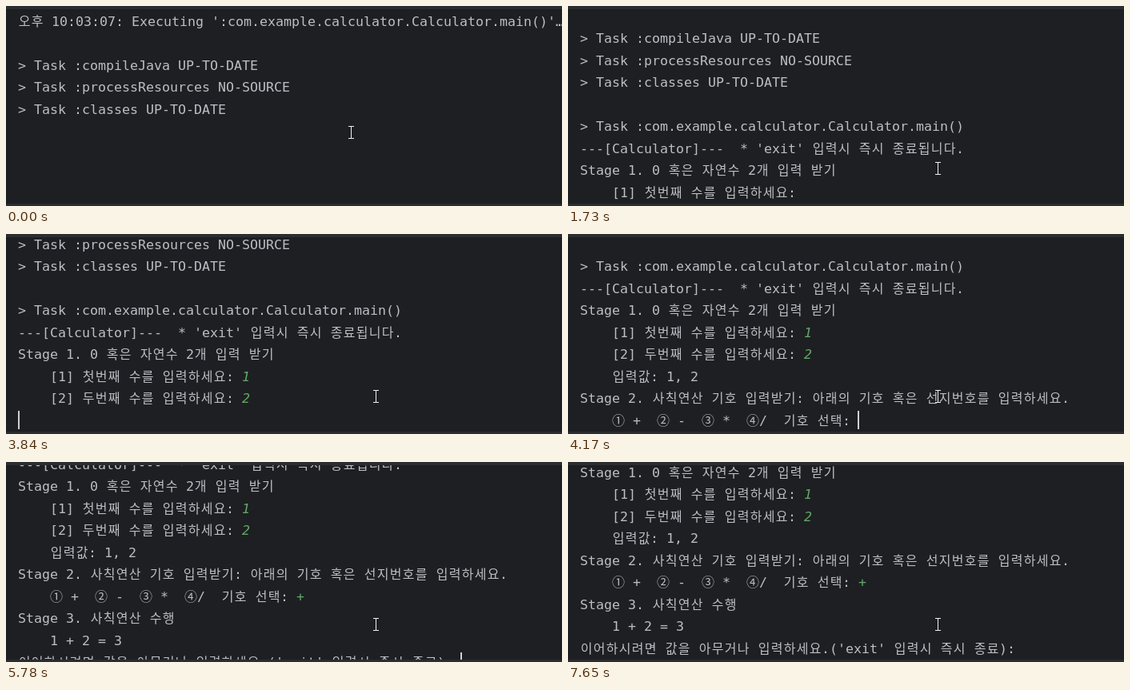
Write an HTML page that moves like this. It is 695 px wide and 250 px high and loops after 8 s.

```html
<!DOCTYPE html>
<html lang="ko">
<head>
<meta charset="utf-8">
<title>Calculator console</title>
<style>
  html, body { margin: 0; width: 100%; height: 100%; overflow: hidden; background: #1e1f22; }
  svg { display: block; width: 695px; height: 250px; }
  text {
    font: 16.6px "DejaVu Sans Mono", "Noto Sans Mono", monospace;
    fill: #bcbec4;
    text-anchor: middle;
    white-space: pre;
  }
  .wide { font: 300 16px "Noto Sans CJK KR", "Noto Sans CJK JP", sans-serif; }
  .input { fill: #62a968; font-style: italic; }
  .edge { fill: #2b2d30; }
  #caret { fill: #ced0d6; }
  #mouse { fill: none; stroke: #f0f0f2; }
</style>
</head>
<body>
<svg viewBox="0 0 695 250">
  <rect width="695" height="250" fill="#1e1f22"/>
  <g id="log"></g>
  <rect id="caret" width="2" height="23"/>
  <rect class="edge" width="695" height="4"/>
  <rect class="edge" y="247" width="695" height="3"/>
  <path id="mouse" d="M-3.5 -7.5H3.5M0 -7.5V7.5M-3.5 7.5H3.5"/>
</svg>
<script>
const LOOP = 8000, LEFT = 15, CELL = 10, WIDE = 16;
const PITCH = 27.5, TOP = 25, BOTTOM = 239;
const BLINK = 500, CLICK = 1230, FOCUS = 2230;
const GLIDE = 70, GLIDE_LAG = 17.5;
const NS = "http://www.w3.org/2000/svg";

// Each block is printed at once; its last line may wait for an answer.
const BLOCKS = [
  { at: 0, text: `오후 10:03:07: Executing ':com.example.calculator.Calculator.main()'…

> Task :compileJava UP-TO-DATE
> Task :processResources NO-SOURCE
> Task :classes UP-TO-DATE` },
  { at: 130, answer: "1", typed: 2430, sent: 2820, text: `
> Task :com.example.calculator.Calculator.main()
---[Calculator]---  * 'exit' 입력시 즉시 종료됩니다.
Stage 1. 0 혹은 자연수 2개 입력 받기
    [1] 첫번째 수를 입력하세요: ` },
  { at: 3090, answer: "2", typed: 3490, sent: 3840, text: "    [2] 두번째 수를 입력하세요: " },
  { at: 4170, answer: "+", typed: 5240, sent: 5510, text: `    입력값: 1, 2
Stage 2. 사칙연산 기호 입력받기: 아래의 기호 혹은 선지번호를 입력하세요.
    ① +  ② -  ③ *  ④/  기호 선택: ` },
  { at: 5780, glides: true, text: `Stage 3. 사칙연산 수행
    1 + 2 = 3
이어하시려면 값을 아무거나 입력하세요.('exit' 입력시 즉시 종료): ` }
];

// Moments that make the caret solid again: a click, silent keys, and all console events.
const wakes = [CLICK, 4270, 4970, 6150,
  ...BLOCKS.flatMap(b => [b.at, b.typed, b.sent]).filter(t => t > CLICK)];

const log = document.getElementById("log");
const caret = document.getElementById("caret");
const mouse = document.getElementById("mouse");
const show = (el, on) => el.setAttribute("visibility", on ? "visible" : "hidden");
const isWide = ch => /[①-⑳가-힣]/.test(ch);

// Adds one run of text on the cell grid and returns its right edge.
function addRun(parent, run, left, cls) {
  const span = document.createElementNS(NS, "tspan");
  const width = isWide(run[0]) ? WIDE : CELL;
  span.setAttribute("x", [...run].map((_, i) => left + (i + 0.5) * width).join(" "));
  if (cls) span.setAttribute("class", cls);
  span.textContent = run;
  parent.append(span);
  return left + run.length * width;
}

function addRow(str, at) {
  const el = document.createElementNS(NS, "text");
  let end = LEFT;
  for (const run of str.match(/[①-⑳가-힣]+|[^①-⑳가-힣]+/g) || [])
    end = addRun(el, run, end, isWide(run[0]) ? "wide" : "");
  log.append(el);
  return { el, end, at };
}

const rows = [];
for (const block of BLOCKS) {
  for (const str of block.text.split("\n")) rows.push(addRow(str, block.at));
  block.last = rows.length - 1;
  if (block.answer) {
    const { el, end } = rows[block.last];
    addRun(el, block.answer, end, "input");
    block.input = el.lastChild;
  }
}

// Progress from 0 to 1 in n jumps, the first at a and the last at b.
function steps(t, a, b, n) {
  const k = Math.floor((t - a) / (b - a) * (n - 1)) + 1;
  return Math.max(0, Math.min(n, k)) / n;
}

function mousePos(t) {
  const p = steps(t, 130, 460, 6), q = steps(t, 730, 1200, 7);
  const dip = Math.sin(Math.PI * q);
  return [431.5 + 38 * p - 7 * q - 6 * dip, 158 + 38 * p + 7 * q + 10 * dip];
}

// Line and x of the caret: the clicked line at first, then the prompt or the fresh line below it.
function caretSpot(t, block) {
  if (t < FOCUS) return [block.last - 1, rows[block.last - 1].end];
  if (t >= block.sent) return [block.last + 1, LEFT];
  return [block.last, rows[block.last].end + (t >= block.typed ? CELL : 0)];
}

function draw(t) {
  const block = BLOCKS.findLast(b => b.at <= t);
  const bottom = block.last + (t >= block.sent ? 1 : 0);
  const lag = block.glides && t < block.at + GLIDE ? GLIDE_LAG : 0;
  const scroll = Math.max(0, TOP + bottom * PITCH - BOTTOM) - lag;
  const baseline = i => Math.floor(TOP + i * PITCH - scroll);

  rows.forEach(({ el, at }, i) => {
    el.setAttribute("y", baseline(i));
    show(el, t >= at);
  });
  for (const { input, typed } of BLOCKS) if (input) show(input, t >= typed);

  const wake = Math.max(...wakes.filter(w => w <= t));
  const lit = t >= CLICK && Math.floor((t - wake) / BLINK) % 2 === 0;
  show(caret, lit);
  if (lit) {
    const [line, x] = caretSpot(t, block);
    caret.setAttribute("x", Math.max(LEFT, x - 1));
    caret.setAttribute("y", baseline(line) - 18);
  }
  mouse.setAttribute("transform", `translate(${mousePos(t)})`);
}

const start = performance.now();
function tick() {
  draw((performance.now() - start) % LOOP);
  requestAnimationFrame(tick);
}
tick();
</script>
</body>
</html>
```
